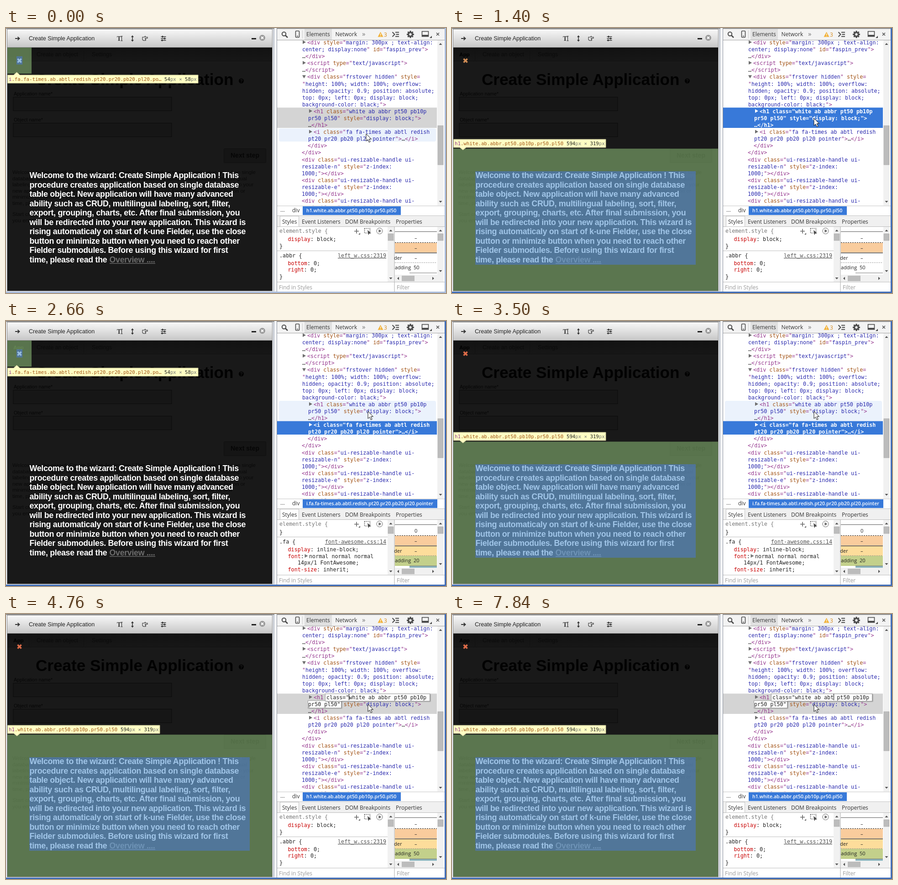
An HTML page for the animation above (8 s loop, 964 by 581 pixels).

```html
<!DOCTYPE html>
<html lang="en">
<head>
<meta charset="utf-8">
<title>Inspector session</title>
<style>
html, body { margin: 0; width: 100%; height: 100%; overflow: hidden; background: #fff; }
svg { display: block; width: 964px; height: 581px; }
text { white-space: pre; }
.mono { font: 11.74px "DejaVu Sans Mono", monospace; }
.tip { font: 10.7px "DejaVu Sans Mono", monospace; }
.ui { font: 12px "Open Sans", sans-serif; fill: #333; }
.crumb { font: 600 10.55px "Open Sans", sans-serif; fill: #fff; }
.app { font-family: "Liberation Sans", Arial, sans-serif; }
.b { font-weight: 700; }
.tight { letter-spacing: -.29px; }
.sel text, .sel tspan { fill: #fff; font-weight: 700; }
.sel path { fill: #fff; }
</style>
</head>
<body>
<svg id="stage" viewBox="0 0 964 581" xmlns="http://www.w3.org/2000/svg"></svg>
<script>
const PURPLE = '#94358d', ORANGE = '#a25316', BLUE = '#2a2aae', PICK = '#3879d9';

const esc = s => s.replace(/&/g, '&amp;').replace(/</g, '&lt;').replace(/>/g, '&gt;');
const rect = (x, y, w, h, fill, extra = '') =>
  `<rect x="${x}" y="${y}" width="${w}" height="${h}" fill="${fill}" ${extra}/>`;
const path = (d, stroke, width = 1, extra = '') =>
  `<path d="${d}" fill="none" stroke="${stroke}" stroke-width="${width}" ${extra}/>`;
const shape = (d, fill, extra = '') => `<path d="${d}" fill="${fill}" ${extra}/>`;
const text = (x, y, s, cls, extra = '') =>
  `<text x="${x}" y="${y}" class="${cls}" ${extra}>${esc(s)}</text>`;
const app = (x, y, s, size, fill, cls = '') =>
  text(x, y, s, 'app ' + cls, `font-size="${size}" fill="${fill}"`);
const runs = (x, y, parts, cls) => `<text x="${x}" y="${y}" class="${cls}">` +
  parts.map(([s, c]) => `<tspan fill="${c}">${esc(s)}</tspan>`).join('') + '</text>';
// A group shown only while state[key] is one of the values.
const when = (rule, body, cls = '') => `<g data-when="${rule}" class="${cls}">${body}</g>`;
const arrow = (x, y, dir, fill = '#555') => shape({
  r: `M${x - 3} ${y - 4}l7 4-7 4z`, d: `M${x - 4} ${y - 3}h8l-4 7z`,
  up: `M${x - 3.5} ${y + 2}h7l-3.5-4z`, dn: `M${x - 3.5} ${y - 2}h7l-3.5 4z`,
  lt: `M${x + 2} ${y - 3.5}v7l-4-3.5z`, rt: `M${x - 2} ${y - 3.5}v7l4-3.5z`
}[dir], fill);

/* ---- application window ---- */
const welcome = [
  'Welcome to the wizard: Create Simple Application ! This',
  'procedure creates application based on single database',
  'table object. New application will have many advanced',
  'ability such as CRUD, multilingual labeling, sort, filter,',
  'export, grouping, charts, etc. After final submission, you',
  'will be redirected into your new application. This wizard is',
  'rising automaticaly on start of k-une Fielder, use the close',
  'button or minimize button when you need to reach other',
  'Fielder submodules. Before using this wizard for first',
  'time, please read the '
];
const intro = [
  'Welcome to the wizard: Create Simple Application ! This procedure creates application based on single',
  'database table object. New application will have many advanced ability such as CRUD, multilingual',
  'labeling, sort, filter, export, grouping, charts, etc. After final submission, you will be redirected into your',
  'new application. This wizard is rising automaticaly on start of k-une Fielder, use the close button or',
  'minimize button when you need to reach other Fielder submodules. Use this software for first',
  'time, please read the Overview.'
];
const outro = [
  'Start creating application by entering names of the application and of the object. If',
  'you enter object name, the wizard will create the table for your new application.'
];

function windowFrame() {
  const ink = '#333';
  return rect(0, 0, 964, 581, '#fff') + rect(0, 0, 594, 581, '#eceff4') +
    rect(586, 2, 1.5, 575, '#a2a8b2') + rect(588, 2, 5, 575, '#f6f8fb') +
    rect(0, 0, 588, 2, '#8e8e8e') + rect(2, 2, 582, 575, '#8b8b8b') +
    rect(3, 3, 580, 40, 'url(#bar)') + rect(3, 42, 580, 1, '#888') +
    path('M20 23h9M25.500 19.500l4 3.500-4 3.500', ink, 1.8) +
    app(50, 27, 'Create Simple Application', 12.6, '#222') +
    text(243, 28, 'T', '', 'font-family="Liberation Serif, serif" font-size="14" font-weight="700" fill="#333"') +
    path('M253.500 18v10M251.500 18h4M251.500 28h4', ink, 1.2) +
    path('M277 19v9', ink, 1.6) + shape('M277 16l3 4h-6zM277 30l3-4h-6z', ink) +
    path('M299 20h4l2-2 1 2h4v2.500h-4v5h-5l-2-2zM304 22.500h3M304 25h3', ink, 1.1) +
    path('M339.500 19h11M339.500 23h11M339.500 27h11', ink, 1.3) +
    shape('M342 17h2v4h-2zM346.500 21h2v4h-2zM341 25h2v4h-2z', ink) +
    rect(538, 22, 10, 3, '#222') +
    '<circle cx="561.500" cy="21.500" r="6.500" fill="#999"/>' + path('M559 19l5 5M564 19l-5 5', '#fff', 2);
}

function page() {
  const ink = '#060606', line = '#0b0b0b';
  const small = (s, i) => app(14, (i > 5 ? 330.5 : 320) + i * 13.6, s, 11.72, '#0a0a0a');
  const field = y => rect(16, y + .5, 347, 30, '#161616', `stroke="${line}"`);
  return rect(3, 43, 580, 533, '#191919') + rect(3, 43, 580, 30, 'url(#tabs)') +
    path('M3 72.500h580M50.500 49v23M170.500 49v23', '#111') +
    `<g id="tab">${text(16, 62, 'App', 'app b', 'font-size="11.7"')}</g>` +
    app(67, 62, 'Create an object', 12.4, '#0b0b0b') + app(188, 62, 'Settings', 12.2, '#0b0b0b') +
    app(65, 125, 'Create Simple Application', 35.1, '#020202', 'b') +
    '<circle cx="515.500" cy="116" r="5.500" fill="#020202"/>' + app(512.6, 119.6, '?', 10, '#1b1b1b', 'b') +
    app(17, 148, 'Application name*', 10.55, ink) + field(151) +
    app(17, 205, 'Object name*', 10.55, ink) + field(208) +
    rect(477.5, 264.5, 92, 31, '#151515', 'rx="2" stroke="#0f0f0f"') +
    app(492, 284, 'Next step', 14, ink, 'b') +
    [...intro, ...outro].map(small).join('') +
    welcome.map((s, i) => app(51.5, 329 + i * 20.5, s, 17.8, '#fff', 'b tight')).join('') +
    app(226.5, 513.5, 'Overview ....', 17.8, '#6c6c6c', 'b tight') + rect(227, 515.5, 100, 1.4, '#6c6c6c') +
    `<g id="close">${path('M25.500 67.500l8 8M33.500 67.500l-8 8', 'currentColor', 3.6)}</g>`;
}

function highlight(o) {
  const { x, y, w, h, cx, cy, cw, ch } = o;
  const ring = `M${x} ${y}h${w}v${h}h${-w}zM${cx} ${cy}v${ch}h${cw}v${-ch}z`;
  const bubble = `M3.500 ${o.ty}${o.up ? 'h13l7-6 7 6' : ''}H${o.tw}v18H${o.up ? 3.5 : '31l-7 5.500-7-5.500H3.5'}z`;
  return shape(ring, 'rgba(147,196,125,.55)') + rect(cx, cy, cw, ch, 'rgba(111,168,220,.66)') +
    shape(bubble, '#ffffc4', 'stroke="#b9b68a"') +
    runs(6, o.ty + 13, [[o.tag, PURPLE], [o.cls, ORANGE]], 'tip') +
    runs(o.sx, o.ty + 13, [[o.size[0], '#222'], ['px', '#777'], [' × ', '#777'], [o.size[1], '#222'], ['px', '#777']], 'tip');
}

const highlights = when('hl=i', highlight({
  x: 3, y: 43, w: 53, h: 57, cx: 23, cy: 62, cw: 13, ch: 18, ty: 103, tw: 421, up: true,
  tag: 'i', cls: '.fa.fa-times.ab.abtl.redish.pt20.pr20.pb20.pl20.po…', sx: 347, size: ['54', '58']
})) + when('hl=h1', highlight({
  x: 3, y: 264.5, w: 580, h: 311.5, cx: 51, cy: 314, cw: 483, ch: 205, ty: 244, tw: 337, up: false,
  tag: 'h1', cls: '.white.ab.abbr.pt50.pb10p.pr50.pl50', sx: 251, size: ['594', '319']
}));

/* ---- element tree ---- */
const handle = side => [[648, '<div class="ui-resizable-handle ui-'],
  [648, `resizable-${side}" style="z-index:`], [648, '1000;"></div>']];
const tree = [
  [660, '<div style="margin: 300px ; text-align:', 'r'],
  [649, 'center; display:none" id="faspin_prev">'],
  [649, '…</div>'],
  [660, '<script type="text/javascript">', 'r'],
  [649, '…<' + '/script>'],
  [660, '<div class="frstover hidden" style=', 'd'],
  [649, '"height: 100%; width: 100%; overflow:'],
  [649, 'hidden; opacity: 0.9; position: absolute;'],
  [649, 'top: 0px; left: 0px; display: block;'],
  [649, 'background-color: black;">'],
  [674, '<h1 class="white ab abbr pt50 pb10p', 'r'],
  [662, 'pr50 pl50" style="display: block;">'],
  [662, '…</h1>'],
  [674, '<i class="fa fa-times ab abtl redish', 'r'],
  [662, 'pt20 pr20 pb20 pl20 pointer">…</i>'],
  [661, '</div>'],
  [648, '</div>'],
  ...handle('n'), ...handle('e'), ...handle('s')
];

// Colours markup character by character, carrying the mode across lines.
function treeLines() {
  let mode = 'text';
  return tree.map(([x, s, fold], i) => {
    const parts = [];
    for (const ch of s) {
      let color = { text: '#333', tag: PURPLE, attr: ORANGE, val: BLUE }[mode];
      if (mode === 'val') {
        if (ch === '"') { mode = 'attr'; color = PURPLE; }
      } else if (ch === '<') { mode = 'tag'; color = PURPLE; }
      else if (ch === '>') { mode = 'text'; color = PURPLE; }
      else if (mode === 'tag' && ch === ' ') mode = 'attr';
      else if (mode === 'attr' && ch === '"') { mode = 'val'; color = PURPLE; }
      else if (mode === 'attr' && ch === '=') color = PURPLE;
      const last = parts[parts.length - 1];
      if (last && last[1] === color) last[0] += ch; else parts.push([ch, color]);
    }
    const y = 32 + i * 15.09;
    return (fold ? arrow(x - 7, y - 1, fold, '#6e6e6e') : '') + runs(x, y + 4, parts, 'mono');
  });
}

function treePane() {
  const rows = treeLines(), cut = (a, b) => rows.slice(a, b).join('');
  const hover = (y, h) => rect(598, y, 344, h, '#ebf2fc', 'rx="4"');
  return rect(594, 27, 351, 363, '#fff') +
    when('row=h1', rect(594, 174.5, 350, 44.5, '#d4d4d4')) + when('row=h1blue', rect(594, 174.5, 350, 44.5, PICK)) +
    when('row=iblue', rect(594, 219.5, 350, 29.5, PICK)) +
    when('hover=i', hover(220, 29)) + when('hover=h1', hover(175, 44)) +
    cut(0, 10) + `<g id="h1row">${cut(10, 13)}</g><g id="irow">${cut(13, 15)}</g>` + cut(15) + scroll(945, 27, 362, 214, 86);
}

function editor() {
  const box = (x, y, w) => rect(x + .5, y + .5, w, 16, '#fff', 'stroke="#a0a0a0" filter="url(#soft)"');
  const first = (s, w) => box(699, 174.5, w) + text(702, 187, s, 'mono', 'fill="#222"');
  return when('edit=old|new',
    box(661, 189.5, 73) + text(662, 202, 'pr50 pl50"', 'mono', 'fill="#222"')) +
    when('edit=old', first('class="white ab abbr pt50 pb10p', 229)) +
    when('edit=new', first('class="white ab abt pt50 pb10p', 221)) +
    rect(0, 0, 1, 14, '#000', 'id="caret"');
}

function scroll(x, y, h, thumbY, thumbH) {
  return rect(x, y, 14, h, '#f1f1f1') + rect(x + 1, thumbY, 12, thumbH, '#bcbcbc', 'stroke="#a8a8a8" stroke-width=".6"') +
    arrow(x + 7, y + 8, 'up') + arrow(x + 7, y + h - 8, 'dn');
}

/* ---- inspector chrome ---- */
function toolbar() {
  const ink = '#4a4a4a';
  const gear = Array.from({ length: 8 }, (_, i) =>
    rect(884.5, 6, 3, 4, ink, `transform="rotate(${i * 45} 886 14)"`)).join('');
  return rect(593, 0, 371, 2, '#8e8e8e') + rect(594, 2, 368, 25, '#f3f3f3') +
    rect(654, 2, 60, 24, '#e0e0e0') + rect(594, 26, 368, 1, '#a3a3a3') +
    `<circle cx="609" cy="13" r="4.200" fill="none" stroke="${ink}" stroke-width="2"/>` + path('M612 16l5 5', ink, 2.6) +
    rect(634.5, 6.5, 8, 14, 'none', `rx="1.500" stroke="${ink}" stroke-width="1.600"`) + rect(637, 17, 3, 1.4, ink) +
    rect(649, 5, 1, 18, '#ccc') +
    text(658, 18, 'Elements', 'ui') + text(721.5, 18, 'Network', 'ui') +
    text(780, 18, '»', 'ui', 'style="font-size:15px;fill:#777"') +
    shape('M820.500 8.500l6 11h-12z', '#f2b23a') + rect(820, 12, 1.2, 4, '#fff') + rect(820, 17, 1.2, 1.2, '#fff') +
    text(828, 18.5, '3', 'ui', 'style="fill:#d58a1c"') +
    path('M846.500 9l5 5-5 5M853 9.500h8M854.500 14h6.500M853 18.500h8', ink, 2) +
    gear + `<circle cx="886" cy="14" r="4.400" fill="none" stroke="${ink}" stroke-width="3.400"/>` +
    rect(911.5, 7.5, 14, 11, 'none', `stroke="${ink}" stroke-width="1.600"`) + rect(912, 15, 14, 4, ink) +
    shape('M928 22h5v-5z', ink) + path('M943 10.500l6 6M949 10.500l-6 6', '#555', 1.6);
}

function crumbs() {
  const pick = (w, s) => rect(650, 391, w, 19, PICK) + text(658, 404, s, 'crumb');
  return rect(594, 390, 368, 22, '#fff') + rect(594, 389.5, 368, 1, '#c4c4c4') +
    text(601, 403, '...', 'ui') + text(627, 404, 'div', 'ui') +
    when('crumb=h1', pick(215, 'h1.white.ab.abbr.pt50.pb10p.pr50.pl50')) +
    when('crumb=i', pick(295, 'i.fa.fa-times.ab.abtl.redish.pt20.pr20.pb20.pl20.pointer')) +
    rect(594, 411, 368, 25, '#f0f0f0') + rect(594, 411, 368, 1, '#c4c4c4') + rect(594, 435, 368, 1, '#bbb') +
    rect(600.5, 412.5, 41, 23, '#fff', 'stroke="#c4c4c4"') +
    [[605, 'Styles'], [648, 'Event Listeners'], [743, 'DOM Breakpoints'], [854, 'Properties']]
      .map(([x, s]) => text(x, 428.5, s, 'ui')).join('');
}

function stylePane() {
  const mono = (x, y, s, fill = '#222') => text(x, y + 4, s, 'mono', `fill="${fill}"`);
  const prop = (y, k, v) => runs(617.5, y + 4, [[k, '#c80000'], [': ' + v + ';', '#222']], 'mono');
  const rule = (y, sel, link) => rect(594, y - 11, 242, 1, '#bfbfbf') + mono(599, y, sel + ' {') +
    text(833, y + 4, link, 'mono', 'fill="#555" text-anchor="end" text-decoration="underline"');
  const ink = '#666';
  return rect(594, 436, 368, 121, '#fff') + mono(599, 445, 'element.style {', '#777') +
    path('M763 445.500h10M768 440.500v10', ink, 1.6) + shape('M772 453h4v-4z', ink) +
    rect(785.5, 439.5, 12, 10, 'none', `stroke="${ink}" stroke-width="1.600" stroke-dasharray="2 1.500"`) +
    shape('M792 443l8 7-4 .5-2 3.500z', '#444') +
    `<circle cx="818.500" cy="445" r="6.500" fill="none" stroke="${ink}"/>` + shape('M816.500 441.500l6 3.500-6 3.500z', ink) +
    when('css=h1|h1color', prop(463, 'display', 'block') + mono(599, 478, '}') +
      rule(499, '.abbr', 'left_w.css:2319') + prop(516, 'bottom', '0') + prop(530, 'right', '0') + mono(599, 545, '}')) +
    when('css=i', mono(599, 463, '}') + rule(484, '.fa', 'font-awesome.css:14') +
      prop(501, 'display', 'inline-block') + runs(617.5, 520, [['font', '#c80000'], [':', '#222']], 'mono') +
      arrow(657.5, 515, 'r', '#777') + mono(664, 516, 'normal normal normal') +
      mono(639, 530, '14px/1 FontAwesome;') + prop(545, 'font-size', 'inherit')) +
    scroll(836, 436, 121, 451, 15) + rect(850.5, 436, 1, 142, '#a8a8a8');
}

function boxModel() {
  const label = (x, y, s) => text(x, y + 4, s, 'ui', 'style="font-size:11px;fill:#222"');
  return rect(852, 446, 92, 1, '#555') + rect(852, 471, 92, 21, '#f9cc9d') +
    when('css=i|h1color', rect(852, 493, 92, 22, '#fddd9b') + rect(852, 515, 92, 22, '#c3d08b') +
      rect(884, 537, 60, 5, '#8cb6c0') + rect(884, 536.5, 60, 1, '#777')) +
    path('M852 470.500h92', '#222', 1, 'stroke-dasharray="3 2"') + rect(852, 492.5, 92, 1.2, '#222') +
    path('M852 514.500h92', '#888', 1, 'stroke-dasharray="2 2"') +
    when('css=h1', rect(884, 536.5, 60, 1, '#777')) +
    when('css=h1|h1color', label(895, 460, '–') + label(893, 525, '50')) +
    when('css=i', label(895, 460, '0') + label(893, 525, '20')) +
    label(895, 482, '–') + label(895, 504, '–') + label(850, 504, 'der') + label(852, 525, 'adding') +
    scroll(945, 436, 105, 451, 15) +
    rect(852, 541, 107, 16, '#f1f1f1') + rect(867, 543, 28, 12, '#bcbcbc') + arrow(859, 549, 'lt') + arrow(936, 549, 'rt');
}

const footer = rect(594, 557, 368, 21, '#fff') + rect(594, 556.5, 368, 1, '#bbb') + rect(850.5, 557, 1, 21, '#a8a8a8') +
  text(598, 573, 'Find in Styles', 'ui', 'style="fill:#999"') + text(856, 573, 'Filter', 'ui', 'style="fill:#999"');

const edges = rect(593, 2, 1, 576, '#8a8f99') +
  ['dim|#a9bcdc', 'focus|#3f6db8'].map(e => {
    const [k, c] = e.split('|');
    return when('win=' + k, rect(961, 0, 3, 581, c) + rect(0, 578, 964, 3, c));
  }).join('');

const pointer = '<path id="mouse" d="M0 0v16l3.700-3.400 2.600 6 2.700-1.200-2.600-5.800h5z" stroke="#111" stroke-width="1"/>';

const gradient = (id, a, b) =>
  `<linearGradient id="${id}" x2="0" y2="1"><stop stop-color="${a}"/><stop offset="1" stop-color="${b}"/></linearGradient>`;
const stage = document.getElementById('stage');
stage.innerHTML = `<defs>${gradient('bar', '#f8f8f8', '#c6c6c6')}${gradient('tabs', '#121212', '#171717')}
  <filter id="soft"><feDropShadow dx="1" dy="1" stdDeviation="1" flood-opacity=".4"/></filter></defs>` +
  windowFrame() + page() + highlights + treePane() + editor() + toolbar() + crumbs() +
  stylePane() + boxModel() + footer + edges + pointer;

/* ---- timeline ---- */
const LOOP = 8000;
const steps = [
  [0, { hl: 'i', row: 'h1', hover: 'i', win: 'dim', crumb: 'h1', css: 'h1', edit: 'no', caret: null,
    mouse: [789, 232], tint: '#fff', tab: 'none', close: '#e8e8e8' }],
  [630, { hl: 'h1', mouse: [790, 219], tab: '#020202', close: '#d08c55' }],
  [700, { mouse: [790, 208], tint: '#f4efa0' }],
  [770, { hover: 'no', mouse: [793, 198], tint: '#fff' }],
  [1330, { row: 'h1blue' }],
  [1400, { win: 'focus' }],
  [2520, { hl: 'i', row: 'iblue', hover: 'h1', crumb: 'i', tab: '#2b3a22', close: '#e8e8e8' }],
  [2660, { css: 'i' }],
  [3500, { hl: 'h1', tab: '#020202', close: '#dc6b48' }],
  [3570, { row: 'h1blue', hover: 'no', crumb: 'h1' }],
  [3640, { css: 'h1color' }],
  [3850, { row: 'h1' }],
  [4130, { edit: 'old', caret: [725, 190] }],
  // Caret column within the first edited line; null while blinked off.
  ...[[4480, 3], [4760, 7], [4900, 13], [5110, 16], [5600, null], [5740, 17], [5880, 18],
    [6090, 19], [6580, null], [6720, 20], [6860, 19], [7070, 18], [7840, 19]]
    .map(([t, n]) => [t, { caret: n && [Math.round(701.9 + 7.07 * n), 175] }]),
  [7840, { edit: 'new' }]
];

const $ = id => document.getElementById(id);
const groups = [...stage.querySelectorAll('[data-when]')].map(el => {
  const [key, values] = el.dataset.when.split('=');
  return { el, key, values: values.split('|') };
});

function draw(t) {
  const s = Object.assign({}, ...steps.filter(([at]) => at <= t).map(([, change]) => change));
  for (const { el, key, values } of groups) el.style.display = values.includes(s[key]) ? '' : 'none';
  $('h1row').setAttribute('class', s.row === 'h1blue' ? 'sel' : '');
  $('irow').setAttribute('class', s.row === 'iblue' ? 'sel' : '');
  $('tab').setAttribute('fill', s.tab);
  $('close').style.color = s.close;
  $('mouse').setAttribute('transform', `translate(${s.mouse})`);
  $('mouse').setAttribute('fill', s.tint);
  $('caret').style.display = s.caret ? '' : 'none';
  if (s.caret) $('caret').setAttribute('transform', `translate(${s.caret})`);
}

const start = performance.now();
function tick() {
  draw((performance.now() - start) % LOOP);
  requestAnimationFrame(tick);
}
tick();
</script>
</body>
</html>
```
